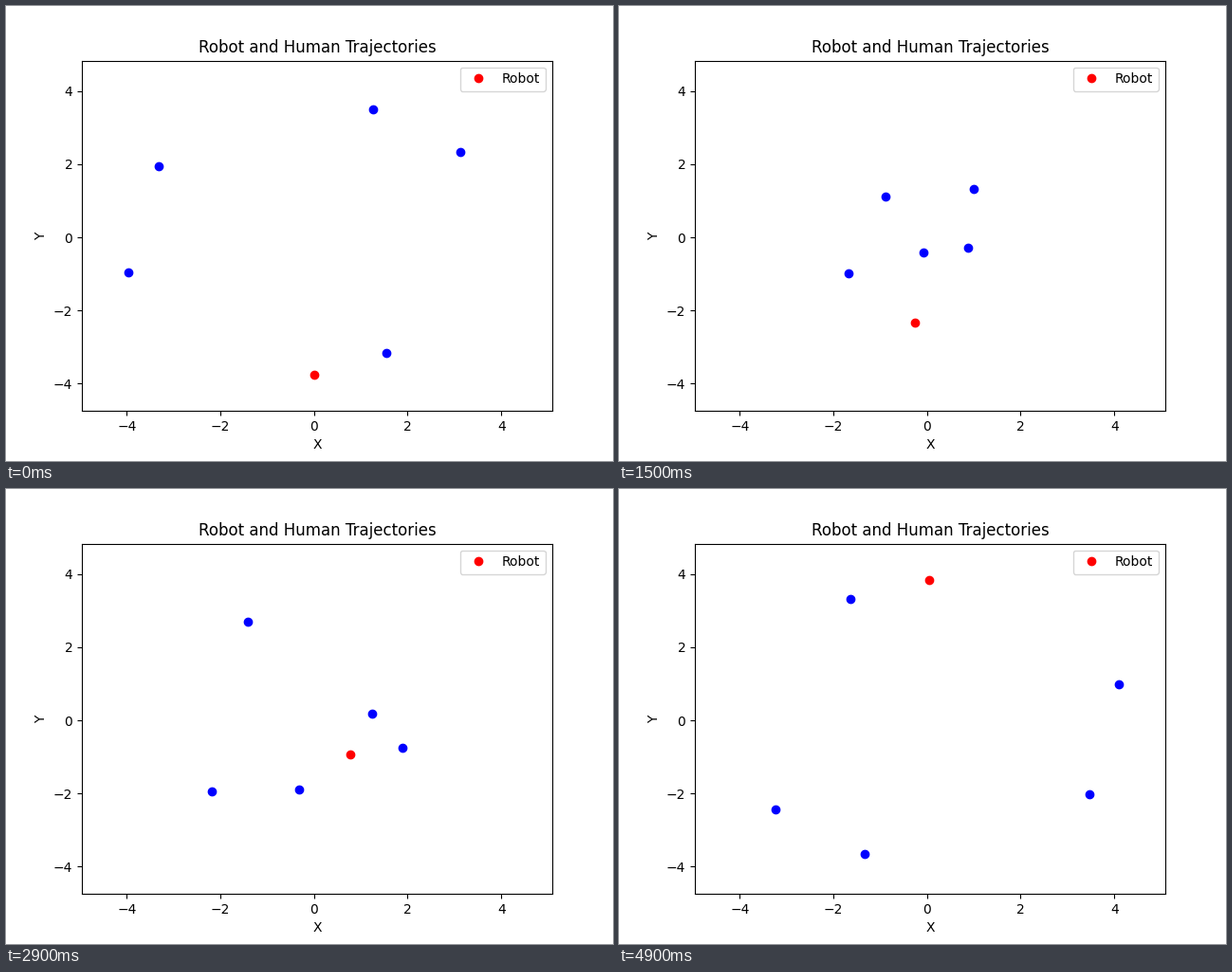
These frames come from a looping animation (640x480 px, 5 s). A matplotlib script:

```python
from itertools import combinations
import numpy as np
import matplotlib.pyplot as plt
from matplotlib.animation import FuncAnimation

FRAMES = 50
STEP = 0.25      # seconds of simulated time per frame
HORIZON = 5      # how far ahead walkers foresee collisions
CLEARANCE = 0.62  # smallest distance between two walkers
EPS = 1e-9

# Every human starts opposite its goal, so all of them cross the centre.
GOALS = np.array([(4.12, .987), (3.472, -2.03), (-1.329, -3.66),
                  (-3.233, -2.43), (-1.635, 3.319)])

# Robot: slows for the crowd, slips to the right, then heads for its goal.
ROBOT_KEYS = np.array([(0, 0, -3.75), (11, -.19, -2.463), (19, -.15, -2.28),
                       (24, .517, -2.10), (25, .59, -1.89), (34, .78, .311),
                       (42, .213, 2.178), (49, .05, 3.833)])


def turn_left(vector):
    return np.array([-vector[1], vector[0]])


def avoidance_line(gap, velocity, other_velocity):
    """Half-plane normal . v >= offset that takes half of the avoidance."""
    relative = velocity - other_velocity
    distance = np.hypot(*gap)
    horizon = HORIZON if distance > CLEARANCE else STEP
    w = relative - gap / horizon
    size, along = np.hypot(*w), w @ gap
    if distance <= CLEARANCE or along < -CLEARANCE * size:
        normal = w / size
        change = CLEARANCE / horizon - size
    else:
        side = np.sign(turn_left(gap) @ w) or -1
        leg = np.sqrt(distance ** 2 - CLEARANCE ** 2)
        normal = (side * leg * turn_left(gap) - CLEARANCE * gap) / distance ** 2
        change = -relative @ normal
    return normal, normal @ velocity + change / 2


def candidate_velocities(preferred, normals, offsets):
    yield preferred
    for normal, offset in zip(normals, offsets):
        yield preferred + (offset - normal @ preferred) * normal
        if abs(offset) < 1:
            reach = np.sqrt(1 - offset ** 2) * turn_left(normal)
            yield offset * normal + reach
            yield offset * normal - reach
    for i, j in combinations(range(len(offsets)), 2):
        pair = normals[[i, j]]
        if abs(np.linalg.det(pair)) > EPS:
            yield np.linalg.solve(pair, offsets[[i, j]])


def best_velocity(preferred, normals, offsets):
    """Allowed velocity nearest the preferred one; relax if there is none."""
    while True:
        allowed = [v for v in candidate_velocities(preferred, normals, offsets)
                   if np.hypot(*v) <= 1 + EPS
                   and np.all(normals @ v >= offsets - EPS)]
        if allowed:
            return min(allowed, key=lambda v: np.hypot(*(v - preferred)))
        offsets = offsets - 0.005


def choose_velocity(i, positions, velocities):
    to_goal = GOALS[i] - positions[i]
    preferred = to_goal / max(1, np.hypot(*to_goal))
    lines = [avoidance_line(positions[j] - positions[i],
                            velocities[i], velocities[j])
             for j in range(len(GOALS)) if j != i]
    normals, offsets = map(np.array, zip(*lines))
    return best_velocity(preferred, normals, offsets)


def walk_humans():
    positions, velocities = -GOALS, np.zeros_like(GOALS)
    path = []
    for _ in range(FRAMES):
        velocities = np.array([choose_velocity(i, positions, velocities)
                               for i in range(len(GOALS))])
        positions = positions + STEP * velocities
        path.append(positions)
    return np.array(path)


def smooth_path(keys, frames):
    """Cubic Hermite curve through the key points."""
    t, xy = keys[:, 0], keys[:, 1:]
    slope = np.gradient(xy, t, axis=0)
    i = np.clip(np.searchsorted(t, frames, side="right") - 1, 0, len(t) - 2)
    span = (t[i + 1] - t[i])[:, None]
    u = (frames - t[i])[:, None] / span
    return ((1 + 2 * u) * (1 - u) ** 2 * xy[i]
            + u * (1 - u) ** 2 * span * slope[i]
            + u ** 2 * (3 - 2 * u) * xy[i + 1]
            + u ** 2 * (u - 1) * span * slope[i + 1])


human_path = walk_humans()
robot_path = smooth_path(ROBOT_KEYS, np.arange(FRAMES))
everyone = np.vstack([human_path.reshape(-1, 2), robot_path])
low, high = everyone.min(axis=0) - 1, everyone.max(axis=0) + 1

fig, ax = plt.subplots(figsize=(6.4, 4.8), dpi=100)
ax.set(xlim=(low[0], high[0]), ylim=(low[1], high[1]), xlabel="X", ylabel="Y",
       title="Robot and Human Trajectories")
robot, = ax.plot([], [], "ro", label="Robot")
humans, = ax.plot([], [], "bo")
ax.legend(loc="upper right")


def update(frame):
    robot.set_data(robot_path[frame:frame + 1].T)
    humans.set_data(human_path[frame].T)
    return robot, humans


animation = FuncAnimation(fig, update, frames=FRAMES, interval=1000 // 10,
                          repeat=True, repeat_delay=0)
plt.show()
```
